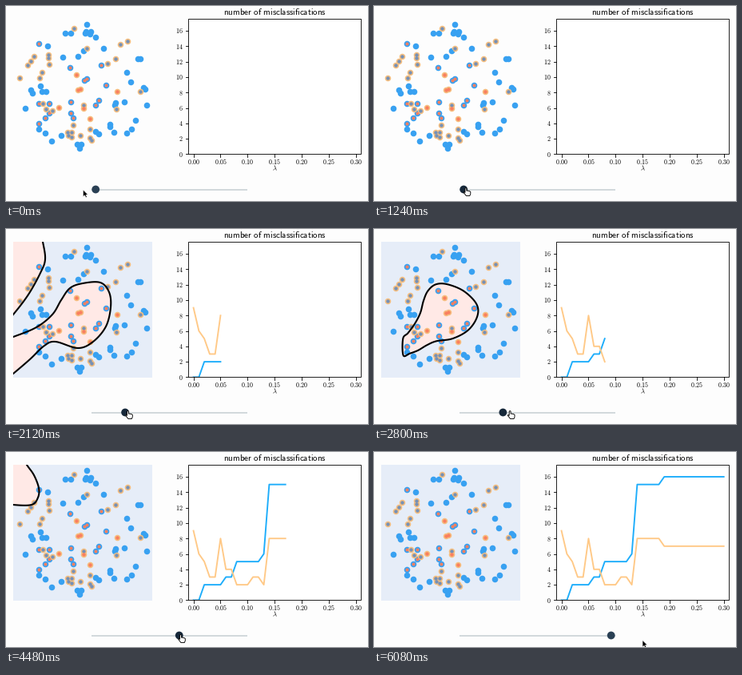
A matplotlib script for the animation above (6120 ms loop, 453 by 244 pixels).

```python
import numpy as np
import matplotlib.pyplot as plt
from matplotlib.animation import FuncAnimation
from matplotlib.patches import Circle, Polygon, Rectangle

W, H, DPI = 453, 244, 64
STEP, FRAMES = 40, 153
PT = 72 / DPI  # points per pixel

BLUE, ORANGE, TAN = "#38a1f1", "#f97f5f", "#f6bf80"
LINE_BLUE, LINE_TAN = "#1dadfb", "#ffc987"
PINK, PALE = "#ffe9e6", "#e6edf8"
HANDLE, PRESSED = "#2a4054", "#16283a"

plt.rcParams["mathtext.fontset"] = "cm"
fig = plt.figure(figsize=(W / DPI, H / DPI), dpi=DPI, facecolor="#fdfdfd")
ax = fig.add_axes([0, 0, 1, 1])
ax.set(xlim=(0, W), ylim=(H, 0))
ax.axis("off")

# ---- scatter: ring colour tells train / test, core colour tells the class
train_blue = [
    (101, 23), (74, 34), (81, 34), (100, 32), (106, 32), (105, 35), (99, 34),
    (112, 39), (122, 53), (97, 56), (90, 63), (71, 64), (52, 50), (165, 66),
    (168, 66), (151, 83), (156, 95), (172, 102), (174, 104), (176, 124),
    (136, 124), (137, 121), (148, 120), (162, 143), (130, 148), (130, 151),
    (135, 158), (151, 159), (157, 154), (116, 160), (112, 157), (89, 173),
    (92, 178), (94, 173), (69, 162), (57, 169), (49, 159), (41, 154),
    (24, 128), (31, 105), (33, 109), (43, 100), (45, 107), (50, 107)]
train_orange = [
    (41, 47), (80, 77), (119, 74), (98, 93), (101, 91), (125, 99), (116, 118),
    (112, 124), (81, 120), (81, 134), (84, 140), (49, 140), (41, 122),
    (41, 147), (54, 122), (54, 134)]
test_blue = [
    (85, 28), (152, 44), (143, 48), (101, 53), (137, 66), (127, 72), (35, 63),
    (53, 61), (53, 65), (54, 73), (31, 69), (27, 74), (45, 83), (42, 90),
    (17, 90), (168, 107), (138, 129), (46, 122), (50, 129), (58, 131),
    (84, 149), (82, 158), (77, 158), (78, 162), (82, 164), (93, 162),
    (105, 165), (107, 168), (105, 154), (97, 124)]
test_orange = [(88, 86), (90, 105), (93, 104), (97, 128), (66, 127),
               (105, 141), (139, 107)]


def dots(points, diameter, color, z):
    x, y = np.array(points).T
    ax.scatter(x, y, s=(diameter * PT) ** 2, c=color, lw=0, zorder=z)


for points, ring, core in [(train_blue, BLUE, BLUE), (train_orange, BLUE, ORANGE),
                           (test_blue, TAN, "#7690b5"), (test_orange, TAN, ORANGE)]:
    dots(points, 7.6, ring, 3)
    dots(points, 4.4 if ring == TAN else 4, core, 3.1)

# ---- decision regions
field = Rectangle((9, 16), 174, 169.5, fc=PALE, lw=0, zorder=1)
ax.add_patch(field)

OPEN = np.array([
    (-12, 142), (9, 135), (38, 123), (58, 107), (69, 89), (80, 74), (96, 68),
    (118, 67), (129, 79), (131, 98), (125, 122), (109, 141), (90, 149),
    (62, 141), (48, 146), (30, 163), (9, 181), (-12, 198)], float)
BLOB = np.array([
    (57, 135), (57, 128), (57, 116), (58, 104), (59, 90), (62, 79), (69, 70),
    (80, 70), (105, 77), (127, 92), (131, 104), (122, 120), (102, 132),
    (85, 140), (74, 145), (66, 147), (60, 145), (57.5, 141)], float)
WEDGE = np.array([(-12, -4), (41, -4), (46, 16), (49, 38), (43, 55), (28, 82),
                  (9, 107), (-12, 130)], float)
CORNER = np.array([(-12, 2), (18, 2), (26, 16), (35, 29), (41, 45), (40, 57),
                   (32, 66), (9, 66), (-12, 62)], float)
NOWHERE = np.full((4, 2), -50.0)


def smooth(p, n=10):
    """Closed Catmull-Rom curve through the points p."""
    a, b, c, d = (np.roll(p, s, axis=0)[:, None] for s in (1, 0, -1, -2))
    u = np.linspace(0, 1, n, endpoint=False)[None, :, None]
    curve = b + 0.5 * u * (c - a + u * (2 * a - 5 * b + 4 * c - d
                                        + u * (3 * (b - c) + d - a)))
    return curve.reshape(-1, 2)


def scaled(p, s):
    origin = np.array([9, 16])
    return origin + (p - origin) * s


def regions(k):
    """Outlines of the orange class for lambda = k / 100."""
    main = corner = NOWHERE
    if k <= 13:
        w = np.interp(k, [5, 6, 7, 8, 9, 10], [0, 0.2, 0.4, 0.7, 0.88, 1])
        main = OPEN * (1 - w) + BLOB * w
        ripple = 0.8 * max(5 - k, 0) * np.sin(2.4 * np.arange(len(OPEN)))
        main = smooth(main + ripple[:, None] * [0.6, 1])
    if k <= 7:
        s = np.interp(k, range(8), [1.05, 0.9, 0.8, 0.75, 0.75, 1, 0.8, 0.65])
        corner = smooth(scaled(WEDGE, s))
    elif 14 <= k <= 18:
        corner = smooth(scaled(CORNER, 1 + 0.05 * (17 - k)))
    return main, corner


def region_patch(**style):
    patch = ax.add_patch(Polygon(NOWHERE, closed=True, **style))
    patch.set_clip_path(field)
    return patch


fills = [region_patch(fc=PINK, lw=0, zorder=2) for _ in range(2)]
edges = [region_patch(fill=False, ec="black", lw=2.1 * PT, zorder=4) for _ in range(2)]

# ---- line chart
train_err = [0, 0, 2, 2, 2, 2, 3, 3, 5, 5, 5, 5, 5, 6] + [15] * 5 + [16] * 12
test_err = [9, 6, 5, 3, 3, 8, 4, 4, 2, 2, 2, 3, 3, 2] + [8] * 5 + [7] * 12


def chart_x(lam):
    return 234.6 + 677 * np.asarray(lam)


def chart_y(v):
    return 185.4 - 9.65 * np.asarray(v)


def label(x, y, s, size, **kw):
    ax.text(x, y, f"${s}$", fontsize=size * PT, color="black", **kw)


frame = Rectangle((228, 16), 216, 169.4, fc="white", lw=0, zorder=1)
ax.add_patch(frame)
ax.add_patch(Rectangle((228, 16), 216, 169.4, fill=False, ec="black",
                       lw=0.85 * PT, zorder=6))
tick = dict(color="black", lw=0.85 * PT, zorder=6)
for v in range(0, 17, 2):
    ax.plot([224.5, 228], [chart_y(v)] * 2, **tick)
    label(222, chart_y(v) + 0.3, rf"\mathrm{{{v}}}", 8, ha="right", va="center")
for i in range(7):
    x = chart_x(0.05 * i)
    ax.plot([x, x], [185.4, 188.9], **tick)
    label(x, 197.6, rf"\mathrm{{{0.05 * i:.2f}}}", 8, ha="center", va="baseline")
label(336, 206.8, r"\lambda", 8.5, ha="center", va="baseline")
label(336, 11, r"\mathsf{number\ of\ misclassifications}", 11,
      ha="center", va="baseline")

curves = []
for data, color in [(train_err, LINE_BLUE), (test_err, LINE_TAN)]:
    line, = ax.plot([], [], color=color, lw=1.9 * PT, zorder=5,
                    solid_joinstyle="round")
    line.set_clip_path(frame)
    curves.append((line, data))

# ---- slider and mouse
ax.plot([107.5, 301], [229.5, 229.5], color="#d2d9dc", lw=2 * PT, zorder=6)
knob = ax.add_patch(Circle((112, 229.5), 4.9, lw=0, zorder=7))

ARROW = np.array([(0, 0), (0, 8.6), (2, 6.8), (3.4, 9.6), (4.8, 9), (3.5, 6.2),
                  (6, 6)])
HAND = np.array([(0, 0.6), (1, 0), (1.9, 0.7), (1.9, 3.6), (3.8, 3.7), (5.6, 4.2),
                 (6.8, 5), (6.8, 7.6), (5.8, 10), (1.4, 10), (-0.8, 7.2),
                 (-2, 5.6), (-1.2, 5), (0, 6)])
arrow = ax.add_patch(Polygon(ARROW, fc="black", ec="white", lw=0.5 * PT, zorder=9))
hand = ax.add_patch(Polygon(HAND, fc="white", ec="black", lw=0.9 * PT, zorder=9))

STEP_TIMES = [1280, 1900, 2080, 2200, 2500, 3140, 3360, 3600, 3800, 4440, 4600,
              5000, 5200, 5700]
STEP_VALUES = [0, 4, 5, 6, 7, 10, 11, 12, 13, 17, 18, 21, 22, 30]
MOUSE_T = [0, 120, 560, 1280, 2120, 3560, 4480, 5040, 5700, 5840, 6000]
MOUSE_X = [96.5, 96.5, 114, 114, 151.5, 189, 217.5, 241, 298, 318, 336]
MOUSE_Y = [230, 230, 227.5, 227.5, 227.5, 227.5, 228.5, 228.5, 229, 237, 235.5]


def level(t):
    return int(np.interp(t, STEP_TIMES, STEP_VALUES) + 1e-6)


def update(i):
    t = i * STEP
    k = level(t)
    started = t >= STEP_TIMES[0]

    field.set_visible(started)
    for outline, fill, edge in zip(regions(k), fills, edges):
        for patch in (fill, edge):
            patch.set_xy(outline)
            patch.set_visible(started)

    n = k + 1 if started else 0
    for line, data in curves:
        line.set_data(chart_x(np.arange(n) / 100), chart_y(data[:n]))

    # the knob runs slightly ahead of the redrawn chart
    knob.center = (112.2 + 6.15 * level(t + 100), 229.5)
    knob.set_facecolor(PRESSED if 1000 <= t < 5760 else HANDLE)

    pos = np.array([np.interp(t, MOUSE_T, MOUSE_X), np.interp(t, MOUSE_T, MOUSE_Y)])
    over = 480 <= t < 5760
    arrow.set_xy(ARROW + pos)
    hand.set_xy(HAND + pos)
    arrow.set_visible(not over)
    hand.set_visible(over)
    return []


anim = FuncAnimation(fig, update, frames=FRAMES, interval=STEP, repeat=True,
                     repeat_delay=0, blit=False)
plt.show()
```
